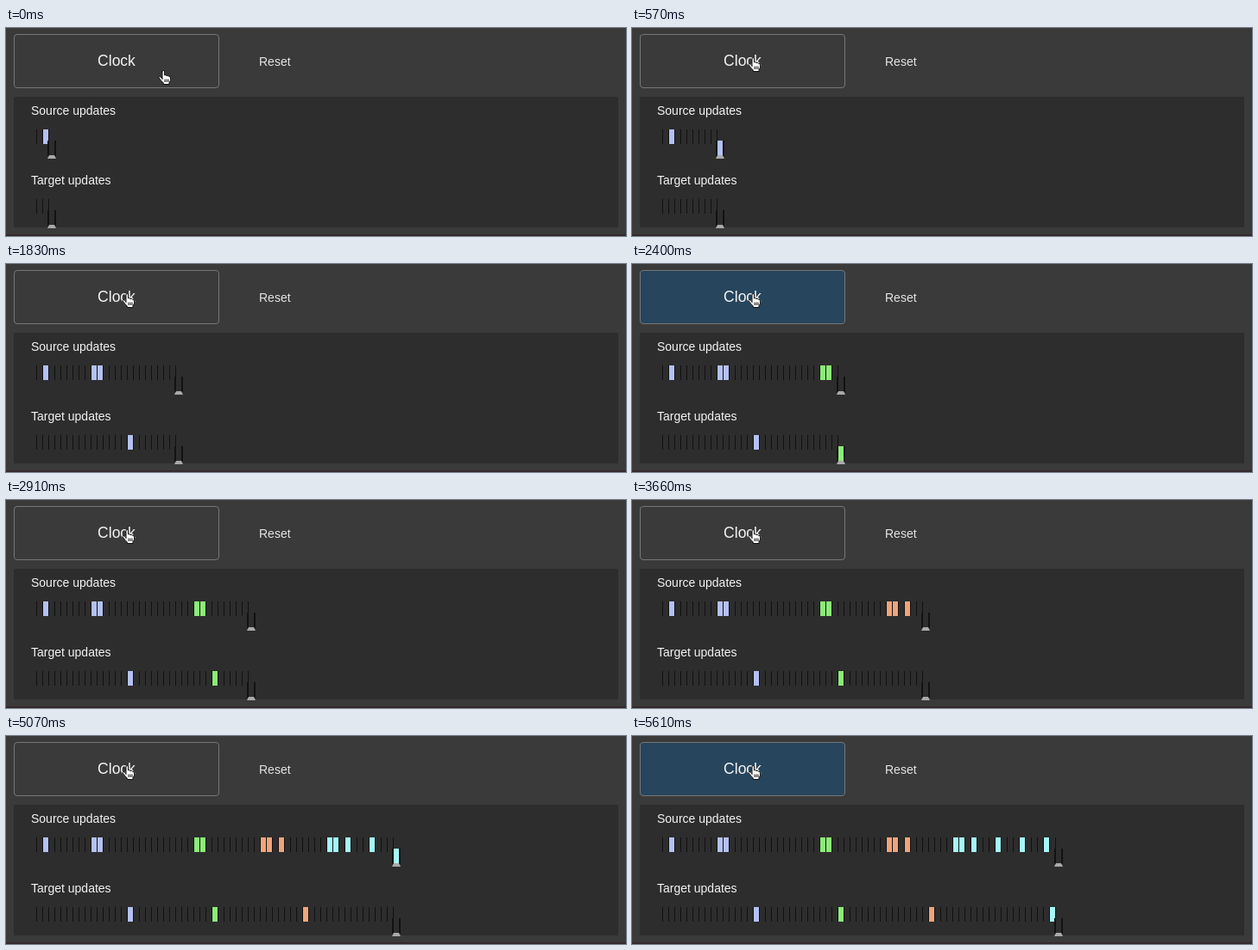
Write an HTML page that moves like this. It is 718 px wide and 242 px high and loops after 5700 ms.

```html
<!DOCTYPE html>
<html lang="en">
<head>
<meta charset="utf-8">
<title>Clocked updates</title>
<style>
  html, body { margin: 0; width: 100%; height: 100%; overflow: hidden; background: #3a3a3a; }
  svg { display: block; }
  text { font: 14px "Liberation Sans", Arial, sans-serif; fill: #f4f4f4; }
</style>
</head>
<body>
<svg width="718" height="242" viewBox="0 0 718 242">
  <rect width="718" height="242" fill="#3a3a3a"/>
  <rect y="240" width="718" height="2" fill="#33292d"/>
  <rect id="button" x="9.5" y="7.5" width="237" height="62" rx="3.5" stroke="#777"/>
  <text x="128" y="44" text-anchor="middle" style="font-size:17.5px">Clock</text>
  <text x="293" y="44" style="fill:#e4e4e4">Reset</text>
  <rect x="9" y="80" width="700" height="152" fill="#2d2d2d"/>
  <text x="29" y="101">Source updates</text>
  <text x="29" y="182">Target updates</text>
  <g id="lanes"></g>
  <path id="hand" fill="#fff" stroke="#111" stroke-linejoin="round"
    d="M5 11V2Q5 .5 6.3 .5T7.6 2V6Q8.7 5 10 6.5Q11.4 5.7 12.4 7.2Q14.5 7 14.5 9V11.5Q14.5 13 13 14.5V16.5H6.3V15Q4 12.7 2 10.2Q.3 8.3 1.6 7.6T5 10M8 10.5V14M10 10.5V14M12 10.5V14"/>
</svg>
<script>
const LOOP = 5700, TICK = 90, STEP = 7, FADE = 120;
const lavender = '#b4c0f4', green = '#8cec78', orange = '#f0a47c', cyan = '#a4f8f8';
const lanes = [
  { y: 118, cells: [[lavender, 1, 9, 10], [green, 26, 27], [orange, 37, 38, 40], [cyan, 48, 49, 51, 55, 59, 63]] },
  { y: 199, cells: [[lavender, 15], [green, 29], [orange, 44], [cyan, 64]] }
];
const presses = [[930, 1200], [2250, 2430], [3690, 3870], [5400, LOOP]];
const [button, lanesBox, hand] = ['button', 'lanes', 'hand'].map(id => document.getElementById(id));

const clamp = v => Math.max(0, Math.min(1, v));
const ease = v => v * v * (3 - 2 * v);
const rect = (x, y, w, h, fill) => `<rect x="${x}" y="${y}" width="${w}" height="${h}" fill="${fill}"/>`;

function lane({ y, cells }, tick) {
  const head = tick + 2, x = 48 + STEP * tick;
  let out = '';
  for (let i = 0; i <= head; i++) out += rect(35 + STEP * i, y, 1, 17, '#111');
  for (const [color, ...places] of cells)
    for (const i of places) {
      if (i < head) out += rect(36 + STEP * i, y, 6, 17, color);
      if (i === head) out += rect(x + 2, y + 13, 6, 18, color);
    }
  out += rect(x, y + 13, 2, 18, '#121212') + rect(x + 8, y + 13, 2, 18, '#121212');
  return out + `<path fill="#aaa" d="M${x + 2} ${y + 30}h6l2 4h-10z"/>`;
}

function draw(t) {
  const tick = Math.floor((t + 60) / TICK);
  lanesBox.innerHTML = lanes.map(l => lane(l, tick)).join('');

  const lit = Math.max(...presses.map(([on, off]) =>
    Math.min(clamp((t - on) / FADE), 1 - clamp((t - off) / FADE))));
  const mix = (a, b) => Math.round(a + (b - a) * lit);
  button.setAttribute('fill', `rgb(${mix(58, 39)},${mix(58, 69)},${mix(58, 92)})`);

  const move = ease(clamp(t / 540));
  hand.setAttribute('transform', `translate(${176 - 42 * move} ${49 - 15 * move})`);
}

const start = performance.now();
function frame() {
  draw((performance.now() - start) % LOOP);
  requestAnimationFrame(frame);
}
frame();
</script>
</body>
</html>
```
